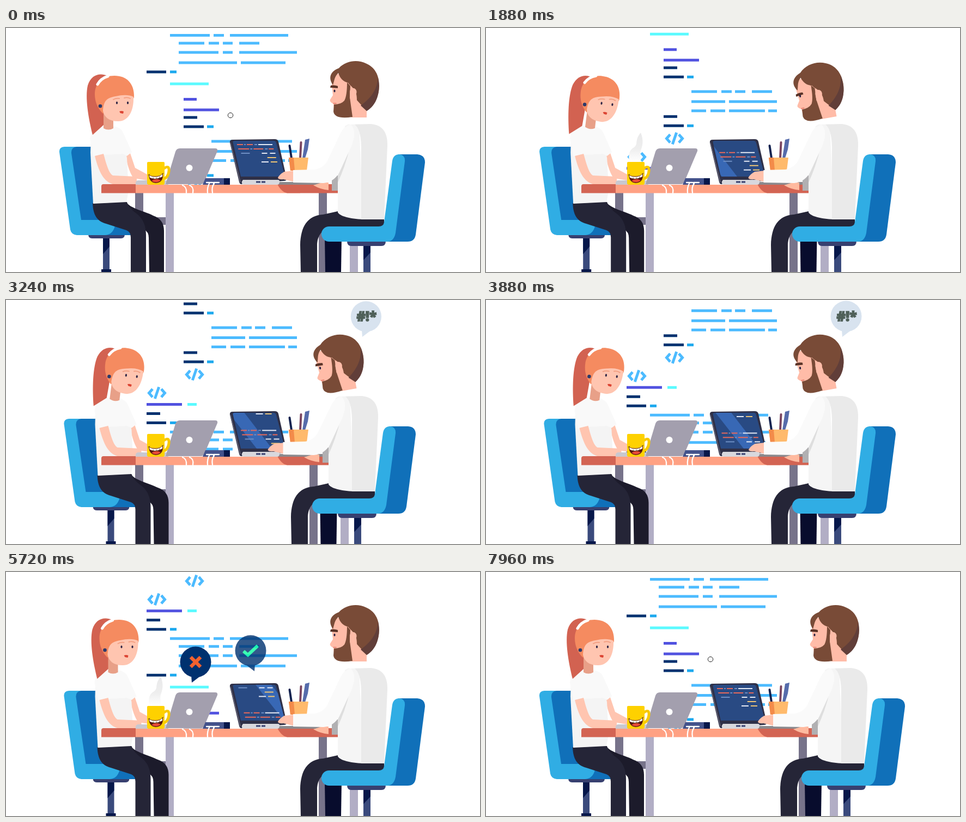
Animation of 870 by 450 pixels, one loop 8000 ms. Source, as an HTML page:

```html
<!DOCTYPE html>
<html lang="en">
<head>
<meta charset="utf-8">
<title>Two developers at a desk</title>
<style>
html, body { margin: 0; width: 100%; height: 100%; overflow: hidden; background: #fff; }
svg { display: block; width: 870px; height: 450px; }
.line { fill: none; stroke-linecap: round; stroke-linejoin: round; }
.sharp { fill: none; stroke-linecap: butt; stroke-linejoin: miter; }
.light { fill: #30ade4; }
.deep { fill: #1070b9; }
.steel { fill: #3a4a7c; }
.bar { fill: #374070; }
.ink { fill: #06174a; }
.post { fill: #b2aec5; }
.shade { fill: #77738a; }
.skin { fill: #ffc5b0; }
text { font: 800 25px "Open Sans", "Noto Sans", sans-serif; fill: #4f6059; stroke: #4f6059; stroke-width: 1.4px; }
</style>
</head>
<body>
<svg viewBox="0 0 870 450">
<defs>
  <clipPath id="above"><rect width="870" height="289"/></clipPath>
  <clipPath id="screen"><path id="glass" d="M417 213Q415 208 420 208L491 208Q495 208 496 212L512 274H431Z"/></clipPath>
  <linearGradient id="mist" x1="0" y1="0" x2="0" y2="1">
    <stop offset="0" stop-color="#e9e9ea"/><stop offset=".55" stop-color="#eee"/>
    <stop offset="1" stop-color="#fff"/>
  </linearGradient>
  <path id="tick" class="sharp" d="M-13 1L-5 8L13 -9" stroke="#0dffa1" stroke-width="6"/>
  <path id="cross" class="sharp" d="M-9 -9L9 9M9 -9L-9 9" stroke="#f4622f" stroke-width="6.500"/>
  <path id="tag" class="sharp" d="M-8 -6.500L-14.500 1L-8 8.500M8 -6.500L14.500 1L8 8.500M3.700 -10L-3.700 11.500" stroke="#4cbbff" stroke-width="5"/>
</defs>

<g clip-path="url(#above)"><g id="code"><g id="page"></g><use href="#page" y="388"/></g></g>

<!-- supports under the desk -->
<path class="shade" d="M237 304h15v60h-15zM275 349h20v14h-20z"/>
<path class="post" d="M293 304h15v146h-15z"/>
<g class="man">
  <path class="shade" d="M574 304h15v146h-15z"/>
  <path class="post" d="M631 396h15v54h-15z"/>
</g>
<path id="farLeg" fill="#080c2d" d="M585 385h31l-1 65h-29z"/>

<g id="woman">
  <path class="steel" d="M178 386h12v64h-12z"/><path class="ink" d="M178 386h12v17l-12 14zM175 445h18v5h-18z"/>
  <path class="bar" d="M151 380h67q0 8-7 8h-53q-7 0-7-8z"/>
  <path class="deep" d="M185 352h44v30h-50z"/>
  <path class="light" d="M98 229Q97 220 107 219H150L170 353Q190 360 200 365Q196 381 182 382H130Q120 381 118 372Z"/>
  <path class="deep" d="M120 231Q119 220 130 219H156L162 322L172 354H138Z"/>
  <path fill="#1c1b2b" d="M200 321H221C226 332 257 339 270 346C284 351 290 360 290 374V450H263L262 387Q262 376 254 372L205 345Z"/>
  <path fill="#252537" d="M159 323L222 321C224 328 228 333 238 341C251 350 257 364 257 382V450H229V386Q229 376 221 373L184 361C166 356 160 344 159 323Z"/>
  <path class="skin" d="M219 232L228 231L237 258L259 270V281L234 277Q224 263 219 232Z"/>
  <path fill="#f4f4f4" d="M156 195Q162 182 179 181L200 182Q211 188 214 200L222 240L225 300L221 321L160 324L155 230Z"/>
  <path fill="#f9f9f9" d="M154 203Q158 184 179 181H198Q210 183 215 193L231 229L222 236L214 232L181 234L160 237Z"/>
  <path class="skin" d="M163 236L179 232C184 250 188 267 196 272L240 274V289H202C181 287 171 268 163 236Z"/>
  <path id="pony" fill="#d26251" d="M186 88C172 82 156 86 150 106C145 128 151 165 159 197L180 178V110Z"/>
  <g id="wHead">
    <path fill="#e8a088" d="M179 155H197V185Q188 190 179 185Z"/>
    <path fill="#f58b60" d="M163 122C163 101 178 88 199 88C221 88 236 102 235 128L227 145H186L178 158C168 148 163 136 163 122Z"/>
    <path class="skin" d="M178 153C179 134 185 129 201 126Q222 121 234 127C235 155 223 173 205 172C189 172 180 164 178 153Z"/>
    <path class="line" d="M168 104Q174 93 187 89" stroke="#fff" stroke-width="5"/>
    <path class="line" d="M197 132Q202 129 208 130M217 129Q223 127 228 130" stroke="#f3a184" stroke-width="2"/>
    <g id="wEyes" fill="#2c2344"><ellipse cx="203.500" cy="138" rx="1.600" ry="2.600"/><ellipse cx="223.500" cy="138" rx="1.600" ry="2.600"/></g>
    <path fill="#dc4433" d="M208 154Q212 152 216 154L215 158L210 157Z"/>
    <circle cx="173" cy="144" r="3.300" fill="#2d3a6b"/>
  </g>
</g>

<!-- desk and the things on it -->
<path id="steam" fill="url(#mist)" d="M263 247C261 232 263 225 272 220C280 214 272 207 284 193C290 208 287 218 284 226C282 234 285 240 284 247Z"/>
<path fill="#ffa183" d="M238 289H540V304.500H238Z"/>
<path fill="#d36453" d="M179 288H238V304.500H175V292Q175 288 179 288ZM498 288H618V304.500H516Q506 303 498 288Z"/>
<path fill="#c9c8d0" d="M242 281H298V289H238Q237 282 242 281Z"/>
<path fill="#a39fae" d="M293 288L311 228Q313 222 319 222H384Q389 222 388 227L364 284Q362 288 358 288Z"/>
<circle cx="336.500" cy="258" r="6" fill="#fff"/>
<path fill="#43528b" d="M366 277H411V289H361Z"/><path class="ink" d="M400 277h11v12h-11z"/>
<path class="line" stroke="#fff" stroke-width="2.300" d="M324 290Q332 293 331 304M337 290Q345 293 343 304M368 285H379M374 285Q369 293 370 304M381 288V285H391M382 287Q377 293 379 304"/>
<path class="line" d="M290 259Q300 252 299 264Q298 275 289 279" stroke="#f7c800" stroke-width="5"/>
<path fill="#fed100" d="M259 249Q259 247 261 247H289Q291 247 291 249V286Q291 289 288 289H262Q259 289 259 286Z"/>
<path fill="#531511" d="M262 271Q276 277 288 269Q289 285 275 286Q263 285 262 271Z"/>
<path fill="#fff" d="M263 272Q276 278 287 270V274Q275 281 264 276Z"/>
<path fill="#e84a35" d="M267 282Q275 276 284 281Q276 288 267 282Z"/>
<path class="line" stroke="#6b4a0b" d="M270 276v3M276 276v3M282 274v3M261 271l3-1M286 269l3-1"/>
<path class="line" stroke="#132350" stroke-width="4" d="M520.500 217L524 240"/>
<path class="line" stroke="#7a4560" stroke-width="4" d="M541.500 211L540 240"/>
<path fill="#566cab" d="M549 206L557 204L554 224L549 240H544Z"/>
<path fill="#ffba6c" d="M519 239H555L552 263H522Z"/><path fill="#f38b4a" d="M519 239H528L530 263H522Z"/>
<path fill="#8b898d" d="M500 284H584V289H500Z"/>
<path fill="#2f3047" d="M411 212Q410 206 416 206L493 205Q499 205 500 210L515 277Q516 282 510 282L432 288Q429 288 428 284Z"/>
<path class="line" d="M412 212L430 284" stroke="#686779" stroke-width="1.500"/>
<use href="#glass" fill="#294a83"/>
<g clip-path="url(#screen)"><path id="glare" fill="#3d70c2" opacity=".8" d="M419 205H448L504 278H476Z"/><g id="rows"></g></g>
<path fill="#d8d8dd" d="M435 280H499Q503 280 502 285Q501 289 498 289H437Q432 289 433 283Z"/>
<path class="bar" d="M459 282.500h8v3h-8zM469 282.500h7v3h-7z"/>

<g class="man">
  <path class="steel" d="M656 400h13v50h-13z"/><path class="ink" d="M656 400h13v14l-13 14z"/>
  <path class="bar" d="M626 393h71q0 9-8 9h-55q-8 0-8-9z"/>
  <path fill="#252537" d="M609 338L694 352V370H598C582 369 571 381 571 402V450H541L540 400C541 366 553 346 582 344Z"/>
  <path fill="#ffba9f" d="M564 290L580 285H592V299Q578 298 564 290Z"/><path fill="#b1b0b2" d="M598 272h14v28h-14z"/>
  <path fill="#f5f5f5" d="M622 181Q632 174 648 177L656 353C630 352 613 347 609 340V270Z"/>
  <path fill="#eaeaea" d="M640 178Q642 176 670 177C690 179 701 191 700 218L694 353H652V218Q651 186 640 178Z"/>
  <path fill="#dedede" d="M632 215L609 272V285Q625 250 632 215Z"/>
  <path fill="#fff" d="M629 178Q636 168 648 165H663Q667 169 668 177Z"/>
  <path id="hand" fill="#ffc1ab"/><path id="arm" fill="#fafafa"/>
  <g id="mHead">
    <path fill="#ffbca8" d="M600 85H640L662 150V165H635L602 150L601 140Q593 136 595 132L600 124L598 106Z"/>
    <path fill="#794b37" d="M600 105C591 92 595 80 611 74C624 60 645 58 660 65C677 72 685 87 685 107C685 126 676 143 662 153L644 133C645 112 632 108 628 101C619 99 613 93 610 83C602 90 603 98 600 105Z"/>
    <path fill="#613e39" d="M683 92C688 119 680 143 662 153L651 143C669 130 681 115 683 92Z"/>
    <path fill="#794b37" d="M626 100L632 107L631 128L636 164Q603 169 601 154L602 141Q615 141 621 134Q626 125 626 100Z"/>
    <path fill="#ffbca8" d="M631 117Q632 110 639 111Q645 114 643 121Q640 128 634 130L631 130Z"/>
    <path class="line" d="M601 139H606" stroke="#e37566" stroke-width="1.500"/>
    <path id="brow" d="M596 106Q602 104.500 609 107V111L595 110Z" fill="#5a3327"/>
    <ellipse id="mEye" cx="603" cy="116" rx="1.600" ry="2.500" fill="#2c2344"/>
  </g>
  <path class="deep" d="M720 233H755Q769 234 769 248L752 381Q750 394 737 394H690Z"/>
  <path class="light" d="M593 366H684Q693 366 694 358L709 245Q711 233 722 233Q733 234 732 246L715 378Q712 394 699 394H593A14 14 0 0 1 593 366Z"/>
</g>

<g id="bubbles"></g>
<circle id="ring" cx="412" cy="161" r="4.700" fill="#fff" stroke="#222"/>
</svg>
<script>
const $ = id => document.getElementById(id);
const set = (id, key, value) => $(id).setAttribute(key, value);
const LOOP = 8000, SPAN = 7960, PAGE = 388;

const SKY = '#4cbbff', NAVY = '#00316f', BLUE = '#1da9ee', CYAN = '#5bfaff', VIOLET = '#5152e0';
// colour, y, then start and end of each dash
const dashes = [
  [SKY, 13.5, 301, 374, 381, 400, 411, 518],
  [SKY, 28, 317, 364, 372, 391, 398, 416, 428, 465],
  [SKY, 45, 317, 390, 398, 416, 428, 534],
  [SKY, 64, 317, 424, 431, 513],
  [NAVY, 81, 258, 294], [BLUE, 81, 301, 313],
  [CYAN, 103, 301, 372],
  [VIOLET, 131.5, 326, 350], [VIOLET, 151, 326, 391],
  [NAVY, 165, 326, 351],
  [NAVY, 182, 326, 363], [BLUE, 182, 369, 381],
  [SKY, 209, 377, 424, 432, 451, 457, 476, 488, 525],
  [SKY, 227.5, 377, 439, 446, 534],
  [SKY, 244.5, 377, 404, 412, 439, 446, 512, 518, 534],
  [NAVY, 255, 326, 351],
  [NAVY, 272, 326, 363], [BLUE, 272, 369, 381],
  [VIOLET, 350.5, 258, 323], [CYAN, 350.5, 333, 350],
  [NAVY, 367.5, 258, 283],
  [NAVY, 384.5, 258, 294], [BLUE, 384.5, 301, 313]
];
const dash = ([color, y, ...xs], width) => {
  let d = '';
  for (let i = 0; i < xs.length; i += 2) d += `M${xs[i]} ${y}H${xs[i + 1]}`;
  return `<path d="${d}" stroke="${color}" stroke-width="${width}"/>`;
};
$('page').innerHTML = dashes.map(row => dash(row, 5)).join('') +
  '<use href="#tag" x="346" y="294.5"/><use href="#tag" x="277" y="328.5"/>';

const RED = '#e8695a', WHITE = '#e6eaf5', GOLD = '#efc574', DIM = '#6f8fc4';
const screenRows = [
  [[RED, 0, 424, 435, 442, 453], [DIM, 0, 437, 440, 456, 461], [WHITE, 0, 463, 489]],
  [[RED, 0, 424, 444, 452, 470], [DIM, 0, 446, 450, 473, 478], [RED, 0, 480, 489]],
  [[DIM, 0, 427, 443], [WHITE, 0, 465, 475, 480, 490]],
  [[GOLD, 0, 473, 489]],
  [[WHITE, 0, 460, 473], [GOLD, 0, 477, 489]]
];
$('rows').innerHTML = screenRows.map(row => `<g>${row.map(part => dash(part, 2)).join('')}</g>`).join('');

// x, y, tail direction, icon, start, end of fade
const bubbles = [
  [338, 164, 1, 'tick', 700, 1800],
  [486, 144, -1, 'cross', 2150, 3200],
  [661, 30, -1, '', 3050, 4180],
  [348, 166, -1, 'cross', 5150, 6300],
  [449, 145, 1, 'tick', 4650, 5890]
];
$('bubbles').innerHTML = bubbles.map(([, , side, icon]) => `<g>
  <g fill="${icon ? NAVY : '#d8e3ef'}"><path d="M${-10 * side} 25L${7 * side} 38L${8 * side} 25Z"/><circle r="28.5"/></g>
  ${icon ? `<use href="#${icon}"/>` : '<text x="1" y="9" text-anchor="middle">#!*</text>'}
</g>`).join('');

const ramp = (t, a, b) => Math.min(1, Math.max(0, (t - a) / (b - a)));
const ease = (t, a, b) => {
  const u = ramp(t, a, b);
  return u < .5 ? 4 * u ** 3 : 1 - 4 * (1 - u) ** 3;
};
const hold = (t, a, b, c, d) => ease(t, a, b) - ease(t, c, d);
const blink = (t, at) => 1 - .8 * Math.max(0, 1 - Math.abs(t - at) / 100);

function draw(t) {
  const p = Math.min(1, t / SPAN);
  set('code', 'transform', `translate(0 ${-PAGE * p})`);

  [...$('rows').children].forEach((row, i) => {
    const y = 209 + (6 + 8 * i + 62.4 * p) % 62.4;
    row.setAttribute('transform', `translate(${.28 * (y - 215)} ${y})`);
  });
  set('glare', 'transform', `translate(${(t - 3880) * .02})`);

  set('woman', 'transform', `translate(${8.5 * hold(t, 1750, 2500, 5800, 7400)})`);
  const nod = hold(t, 250, 850, 4350, 5050);
  set('wHead', 'transform', `rotate(${7 * nod} 201 207)`);
  set('pony', 'transform', `rotate(${10 * nod} 164 158)`);
  set('wEyes', 'transform', `translate(0 138) scale(1 ${blink(t, 7700)}) translate(0 -138)`);

  const lean = hold(t, 800, 1200, 4350, 5150);
  for (const g of document.querySelectorAll('.man')) g.setAttribute('transform', `translate(${-17 * lean})`);
  set('farLeg', 'transform', `translate(${-8.5 * lean})`);
  set('mHead', 'transform', `rotate(${-10.5 * hold(t, 900, 1450, 4300, 4950)} 650 172)`);
  const anger = hold(t, 850, 1050, 3000, 3400);
  set('brow', 'transform', `translate(0 ${4.5 * anger}) rotate(${-12 * anger} 602 108)`);
  set('mEye', 'transform', `translate(0 116) scale(1 ${blink(t, 6870)}) translate(0 -116)`);

  const typing = hold(t, 1800, 2000, 4100, 4300) * 2.5 * Math.sin((3880 - t) / 113);
  const x = 527 - 11 * hold(t, 600, 1000, 1150, 1700) + typing, elbow = 583 + (x - 527) * .5;
  set('hand', 'd', `M${x + 3} 263L${x - 16} 265Q${x - 24} 269 ${x - 28} 276Q${x - 27} 280 ${x - 18} 279L${x + 3} 284Z`);
  set('arm', 'd', `M${x} 262L${elbow - 16} 261Q${elbow} 258 ${elbow + 7} 245L614 194Q620 181 633 178Q645 190 634 218L612 266Q602 284 ${elbow} 286L${x} 285Z`);

  set('steam', 'opacity', hold(t, 300, 900, 1900, 2900) + hold(t, 4950, 5600, 6950, 7600));

  [...$('bubbles').children].forEach((g, i) => {
    const [bx, by, side, , from, to] = bubbles[i];
    const size = 1 - (1 - ramp(t, from, from + 250)) ** 3;
    g.setAttribute('transform', `translate(${bx + 7 * side} ${by + 38}) scale(${size}) translate(${-7 * side} -38)`);
    g.setAttribute('opacity', t < from ? 0 : ramp(t, to, to - 210));
  });
  set('ring', 'opacity', t < 120 || t > 7800 ? 1 : 0);
}

const start = performance.now();
function frame() {
  draw((performance.now() - start) % LOOP);
  requestAnimationFrame(frame);
}
frame();
</script>
</body>
</html>
```
